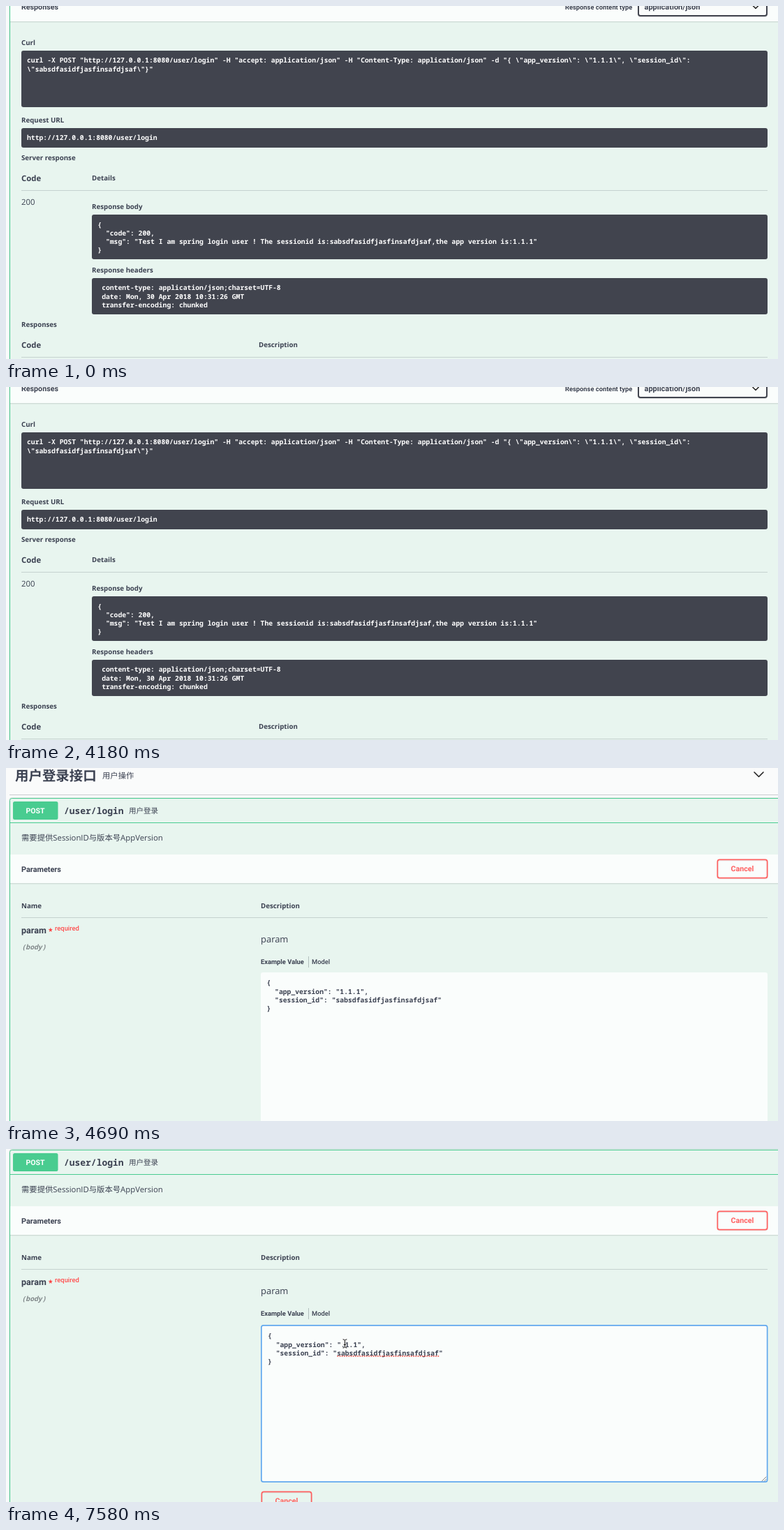
An HTML page that plays this animation: 1106x506 px, repeating every 8 s.

```html
<!DOCTYPE html>
<html lang="zh-CN">
<head>
<meta charset="utf-8">
<title>API console</title>
<style>
  html, body { margin: 0; width: 100%; height: 100%; overflow: hidden; background: #fafbfb; }
  svg { display: block; width: 1106px; height: 506px; }
  text { white-space: pre; text-rendering: geometricPrecision; fill: #3b4151; }
  .sans { font-family: "Open Sans", "Noto Sans CJK SC", "Noto Sans CJK", sans-serif; }
  .ui { font-family: Roboto, "Open Sans", sans-serif; }
  .mono { font-family: "Noto Sans Mono", "DejaVu Sans Mono", monospace; }
</style>
</head>
<body>
<svg id="stage" viewBox="0 0 1106 506"></svg>
<script>
const LOOP = 8000;
const INK = '#3b4151', DARK = '#41444e', GREEN = '#49cc90', RED = '#ff6060', PANEL = '#fafdfc';
const CELL = 9.72, ROW = 12.15;

const stage = document.getElementById('stage');

function add(parent, tag, attrs, content) {
  const node = document.createElementNS('http://www.w3.org/2000/svg', tag);
  for (const key in attrs) node.setAttribute(key, attrs[key]);
  if (content !== undefined) node.textContent = content;
  parent.appendChild(node);
  return node;
}

const page = add(stage, 'g', {});

function box(x1, y1, x2, y2, fill, rx = 0, parent = page) {
  return add(parent, 'rect', { x: x1, y: y1, width: x2 - x1, height: y2 - y1, fill, rx });
}

// Bordered box whose border lies inside the given edges.
function frame(x1, y1, x2, y2, stroke, w, fill = 'none', rx = 3, parent = page) {
  const r = box(x1 + w / 2, y1 + w / 2, x2 - w / 2, y2 - w / 2, fill, rx, parent);
  r.setAttribute('stroke', stroke);
  r.setAttribute('stroke-width', w);
  return r;
}

// Text placed by the middle of its capitals.
function label(x, mid, size, face, weight, content, extra = {}, parent = page) {
  return add(parent, 'text', {
    x, y: Math.round(mid + size * 0.357), class: face,
    style: `font-size:${size}px;font-weight:${weight}` + (extra.fill ? `;fill:${extra.fill}` : '') +
      (extra.italic ? ';font-style:italic' : ''),
    'text-anchor': extra.anchor || 'start'
  }, content);
}

function code(x, mid, lines, fill, parent = page) {
  return lines.map((s, i) => label(x, mid + i * ROW, CELL, 'mono', 600, s, { fill }, parent));
}

function stroke(d, color, w, parent = page) {
  return add(parent, 'path', { d, fill: 'none', stroke: color, 'stroke-width': w, 'stroke-linecap': 'round', 'stroke-linejoin': 'round' });
}

const bold = (x, y, s, size = CELL) => label(x, y, size, 'sans', 700, s);
const rule = y => box(22, y, 1091, y + 1, '#c5d2cf');

function band(y1, y2) {
  box(6, y2, 1106, y2 + 1, '#cfdcd7');
  box(6, y2 + 1, 1106, y2 + 2, '#deebe5');
  box(6, y1, 1106, y2, PANEL);
}

function cancel(x, y) {
  frame(x, y + 1, x + 73, y + 29, 'rgba(0,0,0,.06)', 2);
  frame(x, y, x + 73, y + 28, RED, 1.7);
  label(x + 36.5, y + 14, 10.7, 'ui', 700, 'Cancel', { fill: RED, anchor: 'middle' });
}

function select(x, y, w, h, line) {
  frame(x, y + 1, x + w, y + h + 1, 'rgba(0,0,0,.12)', 2);
  frame(x, y, x + w, y + h, DARK, line, '#fafcfb');
  label(x + 9.5, y + h / 2, 11, 'ui', 700, 'application/json');
  stroke(`M${x + w - 21} ${y + h / 2 - 1.5}l4 4l4 -4`, '#222', 1.5);
}

function heading() {
  label(13, -30, 19.44, 'sans', 700, '用户登录接口');
  label(138, -30, 11.34, 'sans', 400, '用户操作');
  stroke('M1072 -35l6.5 6.5l6.5 -6.5', '#222', 1.6);
  box(5, -3, 1106, -2, '#c9cccf');
}

function summary() {
  frame(4, 1, 1130, 1500, 'rgba(0,0,0,.07)', 3);
  frame(5, 2, 1130, 1500, GREEN, 1, '#e8f5ef');
  box(6, 37, 1106, 38, GREEN);
  box(10, 7, 74.5, 33, GREEN, 2.5);
  label(42, 20, 10.6, 'ui', 700, 'POST', { fill: '#fff', anchor: 'middle' });
  label(83, 20.5, 12.96, 'mono', 600, '/user/login');
  label(176, 20.5, 10.53, 'sans', 400, '用户登录');
  label(22, 58.5, 11.34, 'sans', 400, '需要提供SessionID与版本号AppVersion');
}

function parameters() {
  band(83, 124);
  label(22, 104, 10.9, 'ui', 700, 'Parameters');
  cancel(1018.5, 89.5);
  bold(22, 157, 'Name');
  bold(365, 157, 'Description');
  rule(173);
  label(22, 192, 12.56, 'ui', 700, 'param');
  label(61, 193, 12, 'ui', 700, '*', { fill: '#ff2020' });
  label(70, 188.5, 9.43, 'ui', 500, 'required', { fill: '#ff4f4f' });
  label(22.5, 216, CELL, 'mono', 600, '(body)', { fill: '#7f8688', italic: true });
  label(365, 204, 12.96, 'sans', 400, 'param');
  label(365, 237, 9.35, 'ui', 700, 'Example Value');
  box(433, 229, 434, 245, '#b3bfbe');
  label(438, 237, 9.35, 'ui', 500, 'Model');
}

const body = first => ['{', `  "app_version": "${first}.1.1",`, '  "session_id": "sabsdfasidfjasfinsafdjsaf"', '}'];

function grip(x, y, parent) {
  stroke(`M${x - 6} ${y}l6 -6M${x - 2.5} ${y}l2.5 -2.5`, '#777', 0.9, parent);
}

function form() {
  const idle = add(page, 'g', {});
  box(365, 252, 1091, 479, PANEL, 3, idle);
  code(373.4, 267, body(1), INK, idle);
  grip(1090, 478, idle);

  const focus = add(page, 'g', {});
  frame(365, 253, 1091.5, 479, '#61a8ee', 1.7, PANEL, 3, focus);
  const lines = code(375, 269, body(1), INK, focus);
  grip(1089, 477, focus);
  const spell = add(focus, 'path', {
    d: 'M475 298H620', fill: 'none', stroke: '#f0443c', 'stroke-width': 1.6,
    'stroke-linecap': 'round', 'stroke-dasharray': '.6 2.6'
  });
  const caret = box(0, 0, 1, 12.5, '#111', 0, focus);

  cancel(365.5, 491.5);
  label(365, 542, 9.45, 'ui', 700, 'Parameter content type');
  select(365, 552, 187, 27, 1.6);
  box(29, 630, 558, 660, 'rgba(0,0,0,.05)', 4);
  box(30, 630, 557.5, 658, '#4990e2', 3);
  label(293.5, 644, 11, 'ui', 700, 'Execute', { fill: '#fff', anchor: 'middle' });
  frame(557, 630, 1083, 658, '#7f888a', 1.7);
  label(820, 644, 10.7, 'ui', 700, 'Clear', { anchor: 'middle' });
  return { idle, focus, lines, spell, caret };
}

function responses() {
  band(682, 724);
  label(22, 703.5, 10.7, 'ui', 700, 'Responses');
  label(801, 703.5, 9.35, 'ui', 700, 'Response content type');
  select(905, 689, 186, 28, 2);

  bold(22, 755, 'Curl');
  box(22, 766, 1091, 847, DARK, 3);
  code(30, 780, [
    'curl -X POST "http://127.0.0.1:8080/user/login" -H "accept: application/json" -H "Content-Type: application/json" -d "{ \\"app_version\\": \\"1.1.1\\", \\"session_id\\":',
    '\\"sabsdfasidfjasfinsafdjsaf\\"}"'
  ], '#fff');

  bold(22, 866, 'Request URL');
  box(22, 877, 1091, 905, DARK, 3);
  code(30, 891, ['http://127.0.0.1:8080/user/login'], '#fff');

  bold(22, 920, 'Server response');
  bold(22, 949, 'Code', 11.34);
  bold(123, 948.5, 'Details');
  rule(966);
  label(22, 983, 11.34, 'sans', 400, '200');
  bold(123, 990, 'Response body');
  box(123, 1001, 1091, 1065, DARK, 3);
  code(131.3, 1015.5, [
    '{', '  "code": 200,',
    '  "msg": "Test I am spring login user ! The sessionid is:sabsdfasidfjasfinsafdjsaf,the app version is:1.1.1"',
    '}'
  ], '#fff');
  bold(123, 1081, 'Response headers');
  box(123, 1092, 1091, 1144, DARK, 3);
  code(131.3, 1106, [
    ' content-type: application/json;charset=UTF-8',
    ' date: Mon, 30 Apr 2018 10:31:26 GMT',
    ' transfer-encoding: chunked'
  ], '#fff');

  bold(22, 1159, 'Responses');
  bold(22, 1188, 'Code', 11.34);
  bold(362, 1187.5, 'Description');
  rule(1205);
}

heading();
summary();
parameters();
const ui = form();
responses();

const arrow = add(stage, 'path', {
  d: 'M.7 .8V12.2L3.4 9.7L5.2 14L7.3 13.1L5.5 8.9H9.4Z',
  fill: '#000', stroke: '#fff', 'stroke-width': 1, 'stroke-linejoin': 'round'
});
const beam = add(stage, 'g', {});
const beamPath = 'M1 .9Q3.4 .9 3.5 2.6Q3.6 .9 6 .9M3.5 2.4V11.6M1 13.1Q3.4 13.1 3.5 11.4Q3.6 13.1 6 13.1M2.2 8.5H4.8';
stroke(beamPath, 'rgba(255,255,255,.8)', 2.2, beam);
stroke(beamPath, '#111', 1, beam);

// Step tables: time, then the value held from that time on.
const scroll = [[0, -702], [4180, -701], [4330, -386], [4510, -150], [4690, 41], [5460, 0], [5610, -1]];
const pointer = [
  [0, null], [720, arrow, 94, -4], [890, arrow, 86, -10], [1640, null],
  [5790, arrow, 311, 227], [5970, arrow, 437, 251],
  [6110, beam, 496, 258], [6250, beam, 496, 259], [6400, beam, 496, 260],
  [6550, beam, 495, 270], [6700, beam, 493, 271], [6840, beam, 482, 271], [6990, beam, 482, 272]
];
const carets = [[0, null], [6400, 380.5, 262.5], [6840, 486, 275], [7440, 480, 275], [7580, null]];

const at = (table, t) => table.filter(step => step[0] <= t).pop();
const show = (node, on) => { node.style.display = on ? '' : 'none'; };
const move = (node, x, y) => node.setAttribute('transform', `translate(${x} ${y})`);

function render(t) {
  move(page, 0, at(scroll, t)[1]);

  const [, shape, px, py] = at(pointer, t);
  show(arrow, shape === arrow);
  show(beam, shape === beam);
  if (shape) move(shape, px, py);

  const active = t >= 6400;
  show(ui.idle, !active);
  show(ui.focus, active);
  show(ui.spell, t >= 6550);
  const line = body(t >= 7440 ? '' : 1)[1];
  if (ui.lines[1].textContent !== line) ui.lines[1].textContent = line;

  const [, cx, cy] = at(carets, t);
  show(ui.caret, cx != null);
  if (cx != null) move(ui.caret, cx, cy);
}

const start = performance.now();
function tick(now) {
  render(Math.max(0, now - start) % LOOP);
  requestAnimationFrame(tick);
}
render(0);
requestAnimationFrame(tick);
</script>
</body>
</html>
```
